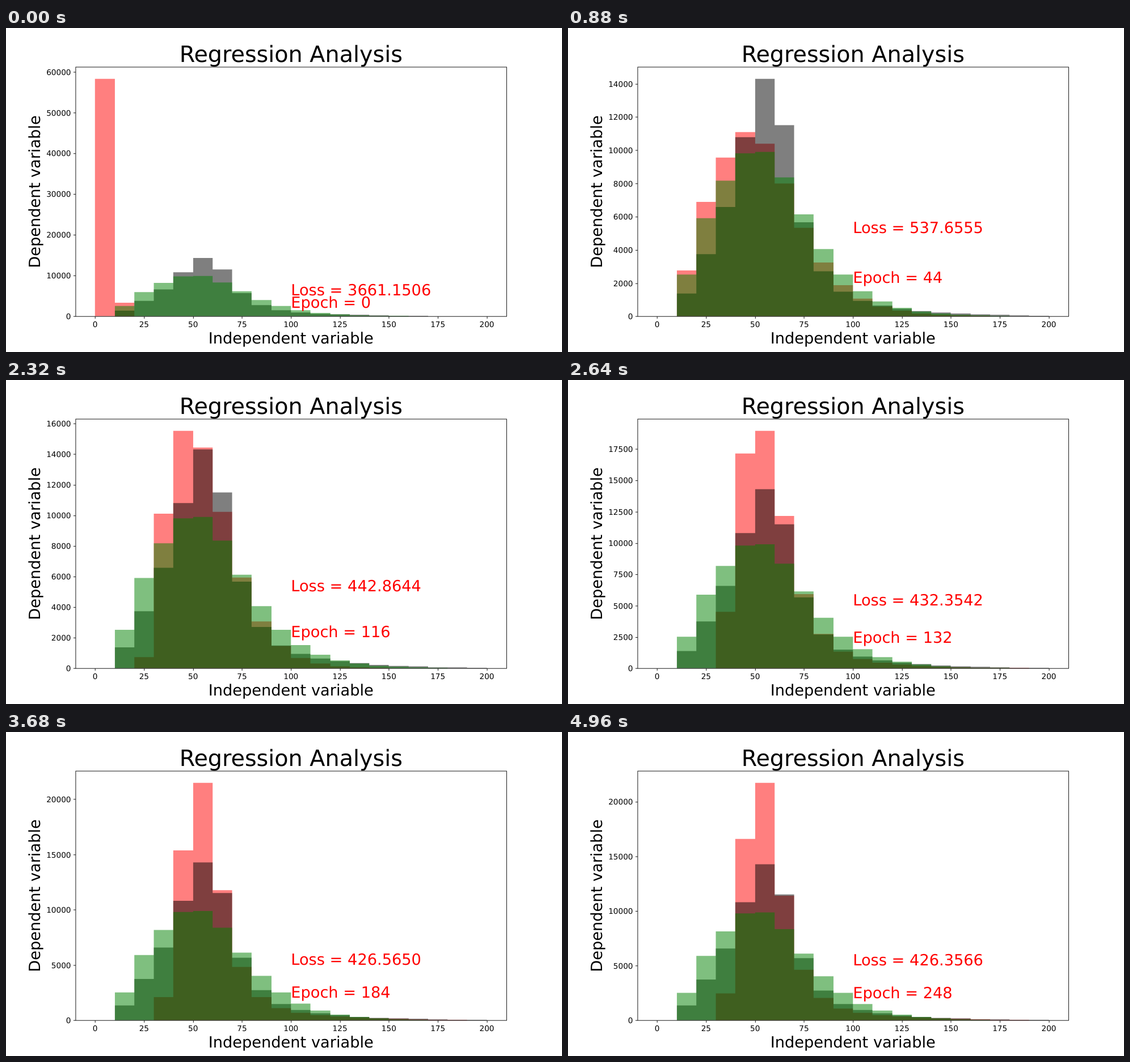
Write an HTML page that moves like this. It is 980 by 572 pixels and loops after 5040 ms.

```html
<!DOCTYPE html>
<html lang="en">
<head>
<meta charset="utf-8">
<title>Regression Analysis</title>
<style>
  html, body { margin: 0; width: 100%; height: 100%; overflow: hidden; background: #fff; }
  svg { display: block; }
  text { font-family: "DejaVu Sans", sans-serif; text-rendering: geometricPrecision; }
  .tick { font-size: 13.61px; }
  .label { font-size: 27.22px; }
  .title { font-size: 39.7px; }
  .mid { text-anchor: middle; }
  .end { text-anchor: end; }
  .note { fill: #f00; }
  .bars { fill-opacity: .5; }
  .line { fill: none; stroke: #000; stroke-width: .91; }
</style>
</head>
<body>
<svg id="stage" width="980" height="572" viewBox="0 0 980 572"></svg>
<script>
const LEFT = 122.5, RIGHT = 882, TOP = 68.64, BOTTOM = 509.08;
const STEP = 80, STEPS = 63, EPOCHS = 4, BINS = 20;
const DOT = 980 / 1200;  // the chart is laid out on a 1200 px grid
const svg = document.getElementById('stage');

function add(tag, attrs, text, parent = svg) {
  const el = document.createElementNS('http://www.w3.org/2000/svg', tag);
  for (const name in attrs) el.setAttribute(name, attrs[name]);
  if (text !== undefined) el.textContent = text;
  return parent.appendChild(el);
}

const px = x => LEFT + (x + 10) / 220 * (RIGHT - LEFT);
const snap = v => Math.round(v / DOT) * DOT;
const snapLine = v => snap(v) + DOT / 2;
const mix = (a, b, u) => a + (b - a) * u;
const clamp = v => Math.min(1, Math.max(0, v));
const sech = (x, power) => Math.cosh(x) ** -power;

// Bell-shaped counts that fade in above `from`, with an optional long tail.
function histogram({ height, mean, width, right = width, power, from, tail = 0 }) {
  return Array.from({ length: BINS }, (_, i) => {
    const x = i * 10 + 5, d = x - mean;
    const bell = height * sech(d / (d < 0 ? width : right), power);
    const extra = 620 * tail * sech((x - 95) / 30, 1);
    return (bell + extra) * clamp((x - from) / 14);
  });
}

const truth = histogram({ height: 14180, mean: 57.5, width: 14.3, right: 9.5, power: .86, from: 5.8, tail: 1 });
const reference = histogram({ height: 10080, mean: 50.5, width: 30, power: 1.65, from: 5.9 });

const poses = [
  { epoch: 44, loss: 537.6555, height: 11150, mean: 47, width: 27, power: 1.6, from: 6.2, tail: 0 },
  { epoch: 96, loss: 486.8288, height: 11850, mean: 52, width: 27, power: 1.65, from: 13.7, tail: 0 },
  { epoch: 116, loss: 442.8644, height: 15680, mean: 47.5, width: 26.5, power: 2.1, from: 23.7, tail: 0 },
  { epoch: 152, loss: 427.6622, height: 21150, mean: 53.5, width: 8.5, power: .85, from: 30.5, tail: .8 },
  { epoch: 220, loss: 426.1377, height: 21800, mean: 53.2, width: 8.5, power: .85, from: 30.3, tail: .8 },
  { epoch: 248, loss: 426.3566, height: 22230, mean: 52.6, width: 8.5, power: .85, from: 30, tail: .8 }
];

// Histogram of the same values after multiplying them by k.
function rescale(bins, k) {
  const out = Array(BINS).fill(0);
  bins.forEach((count, i) => {
    const a = (i === 1 ? 13 : i * 10) * k, b = (i + 1) * 10 * k;
    for (let j = 0; j < BINS; j++) {
      const overlap = Math.min(b, j * 10 + 10) - Math.max(a, j * 10);
      if (overlap > 0) out[j] += count * overlap / (b - a);
    }
  });
  return out;
}

// First the predictions grow from near zero, then they ease from pose to pose.
function predict(epoch) {
  const first = poses[0];
  if (epoch < first.epoch) {
    const gap = (1 - epoch / first.epoch) ** 1.5;
    return {
      loss: mix(first.loss, 3661.1506, gap * gap),
      bins: rescale(histogram(first), 1 - .895 * gap)
    };
  }
  const next = Math.max(1, poses.findIndex(p => p.epoch >= epoch));
  const a = poses[next - 1], b = poses[next];
  const u = 1 - (1 - (epoch - a.epoch) / (b.epoch - a.epoch)) ** 2;
  const pose = {};
  for (const name in a) pose[name] = mix(a[name], b[name], u);
  return { loss: pose.loss, bins: histogram(pose) };
}

function tickStep(max) {
  for (let base = 1000; ; base *= 10)
    for (const m of [1, 2, 2.5, 5])
      if (max / (base * m) <= 9) return base * m;
}

function outline(bins, py) {
  const floor = snap(BOTTOM);
  let d = `M${snap(px(0))} ${floor}`;
  bins.forEach((v, i) => { d += `V${snap(py(v))}H${snap(px(i * 10 + 10))}`; });
  return d + `V${floor}Z`;
}

const series = ['#f00', '#000', '#008000'].map(fill => add('path', { class: 'bars', fill }));
const [x0, x1, y0, y1] = [LEFT, RIGHT, TOP, BOTTOM].map(snapLine);
add('rect', { class: 'line', x: x0, y: y0, width: x1 - x0, height: y1 - y0 });
for (let x = 0; x <= 200; x += 25) {
  add('path', { class: 'line', d: `M${snapLine(px(x))} ${y1}v4` });
  add('text', { class: 'tick mid', x: px(x), y: 528.4 }, x);
}
const center = (LEFT + RIGHT) / 2;
add('text', { class: 'title mid', x: center, y: 60 }, 'Regression Analysis');
add('text', { class: 'label mid', x: center, y: 556.7 }, 'Independent variable');
add('text', { class: 'label mid', transform: 'translate(59.6 289) rotate(-90)' }, 'Dependent variable');

const yTicks = Array.from({ length: 10 }, () => {
  const g = add('g', {});
  add('path', { class: 'line', d: `M${x0} 0h-4` }, undefined, g);
  return { g, text: add('text', { class: 'tick end', x: LEFT - 8, y: 4.7 }, '', g) };
});
const lossText = add('text', { class: 'label note', x: px(100) });
const epochText = add('text', { class: 'label note', x: px(100) });

function draw(epoch) {
  const { loss, bins } = predict(epoch);
  const max = 1.05 * Math.max(...bins, ...truth);
  const py = v => BOTTOM - v / max * (BOTTOM - TOP);
  [bins, truth, reference].forEach((b, i) => series[i].setAttribute('d', outline(b, py)));
  const step = tickStep(max);
  yTicks.forEach(({ g, text }, i) => {
    const v = i * step;
    g.style.display = v <= max ? '' : 'none';
    g.setAttribute('transform', `translate(0 ${snapLine(py(v))})`);
    text.textContent = v;
  });
  lossText.textContent = `Loss = ${loss.toFixed(4)}`;
  lossText.setAttribute('y', py(5000) - .6);
  epochText.textContent = `Epoch = ${epoch}`;
  epochText.setAttribute('y', py(2000) - .6);
}

const start = performance.now();
let shown = -1;
function tick() {
  const step = Math.floor((performance.now() - start) / STEP) % STEPS;
  if (step !== shown) draw((shown = step) * EPOCHS);
  requestAnimationFrame(tick);
}
tick();
</script>
</body>
</html>
```
